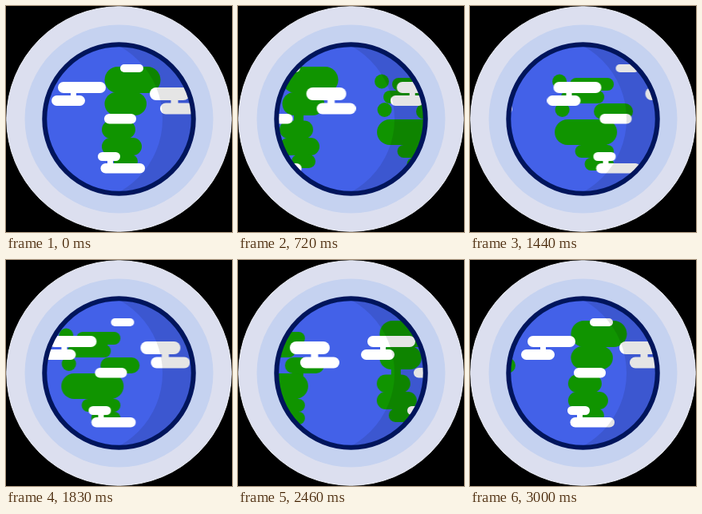
Recreate the animation shown at these times as an HTML page. Size 283 by 283 pixels, loop 3030 ms.

```html
<!DOCTYPE html>
<html lang="en">
<head>
<meta charset="utf-8">
<title>Turning globe</title>
<style>
  html, body { margin: 0; width: 100%; height: 100%; overflow: hidden; background: #000; }
  svg { display: block; width: 100%; height: 100%; }
  .land { fill: #109400; animation: turn 3030ms steps(101) infinite; }
  .sky { fill: #fff; }
  .sky > use { animation: 3030ms steps(101) infinite; }
  .sky > .first { animation-name: drift-first; }
  .sky > .second { animation-name: drift-second; }
  .sky > .third { animation-name: drift-third; }

  @keyframes turn {
    from { transform: translateX(0); }
    to { transform: translateX(-286px); }
  }
  @keyframes drift-first {
    from { transform: translateX(65px); }
    to { transform: translateX(-332.5px); }
  }
  /* The second bank speeds up once the third one comes into view. */
  @keyframes drift-second {
    0% { transform: translateX(293px); animation-timing-function: steps(69); }
    68.3168% { transform: translateX(22px); animation-timing-function: steps(32); }
    100% { transform: translateX(-155.6px); }
  }
  @keyframes drift-third {
    from { transform: translateX(572px); }
    to { transform: translateX(67px); }
  }
</style>
</head>
<body>
<svg viewBox="0 0 283 283">
  <defs>
    <clipPath id="globe"><circle cx="141.5" cy="141.5" r="91"/></clipPath>

    <g id="tall-land">
      <rect x="123.5" y="76" width="70" height="33" rx="16.5"/>
      <rect x="138" y="100" width="24" height="16"/>
      <rect x="123.5" y="108" width="52.5" height="29" rx="14.5"/>
      <rect x="138" y="134" width="12" height="12"/>
      <rect x="120" y="143.5" width="42" height="22.5" rx="11.25"/>
      <rect x="120" y="165" width="50" height="22" rx="11"/>
      <rect x="135" y="186" width="30" height="17" rx="8.5"/>
    </g>

    <g id="wide-land">
      <circle cx="248" cy="94.5" r="9"/>
      <rect x="261" y="90" width="55" height="16" rx="8"/>
      <rect x="250" y="106" width="54" height="16" rx="8"/>
      <rect x="266" y="100" width="34" height="12"/>
      <circle cx="251.5" cy="130" r="9"/>
      <rect x="291" y="122" width="49" height="20" rx="10"/>
      <rect x="300" y="136" width="14" height="10"/>
      <rect x="242" y="142" width="78" height="32" rx="16"/>
      <rect x="276" y="170" width="31" height="8"/>
      <rect x="267.5" y="174" width="48.5" height="16" rx="8"/>
      <rect x="288" y="186" width="20" height="8"/>
      <rect x="279.5" y="190" width="36.5" height="16" rx="8"/>
    </g>

    <g id="clouds">
      <rect x="78" y="73" width="29" height="10" rx="5"/>

      <rect x="0" y="95" width="60" height="14" rx="7"/>
      <rect x="16" y="107" width="7" height="7"/>
      <rect x="-8" y="112" width="42" height="13" rx="6.5"/>

      <rect x="115" y="102" width="50" height="16" rx="8"/>
      <rect x="141.5" y="116" width="9" height="7"/>
      <rect x="128" y="121.5" width="49" height="14" rx="7"/>

      <rect x="58" y="135" width="40" height="12.5" rx="6.25"/>

      <rect x="50" y="183" width="28" height="11" rx="5.5"/>
      <rect x="62" y="192" width="7" height="7"/>
      <rect x="53.5" y="197" width="55.5" height="12.5" rx="6.25"/>
    </g>
  </defs>

  <circle cx="141.5" cy="141.5" r="140.75" fill="#dcdfef" stroke="#eff1f9"/>
  <circle cx="141.5" cy="141.5" r="118" fill="#c5d2f0"/>

  <g clip-path="url(#globe)">
    <circle cx="141.5" cy="141.5" r="92" fill="#4361e8"/>
    <g class="land">
      <use href="#tall-land"/>
      <use href="#wide-land"/>
      <use href="#tall-land" x="286"/>
    </g>
    <g class="sky">
      <use class="first" href="#clouds"/>
      <use class="second" href="#clouds"/>
      <use class="third" href="#clouds"/>
    </g>
    <!-- Night side: everything outside the lit disc -->
    <path d="M0 0H283V283H0Z M92 37.5a104 104 0 0 1 0 208H0V37.5Z" fill-rule="evenodd" fill-opacity=".1"/>
  </g>
  <circle cx="141.5" cy="141.5" r="93.25" fill="none" stroke="#00155c" stroke-width="6"/>
</svg>
</body>
</html>
```
